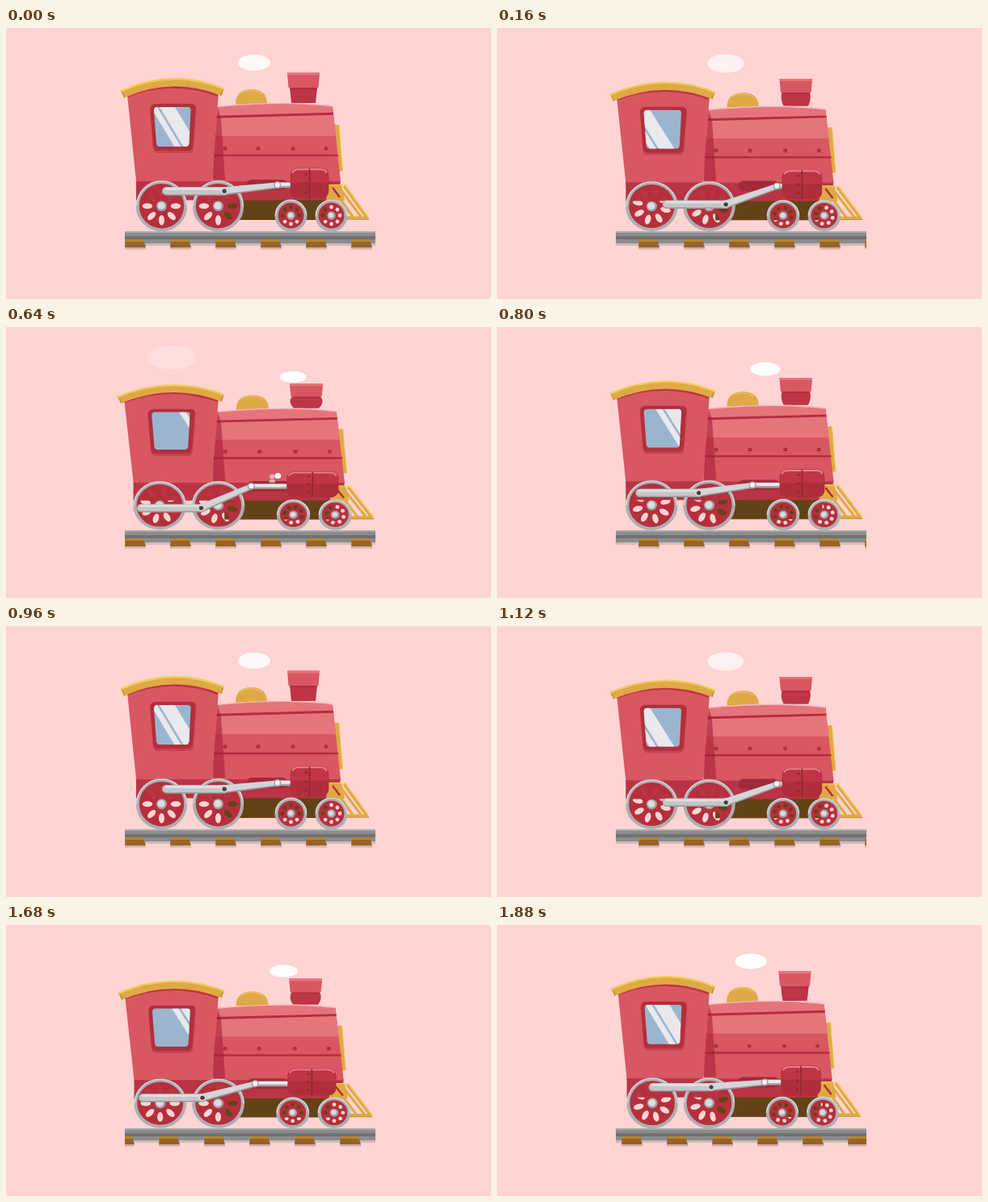
These frames come from a looping animation (600 by 336 pixels, 1.92 s). An HTML page with a canvas:

```html
<!DOCTYPE html>
<html>
<head>
<meta charset="utf-8">
<style>
html, body { margin: 0; width: 600px; height: 336px; overflow: hidden; background: #ffd4d2; }
canvas { display: block; }
</style>
</head>
<body>
<canvas id="stage" width="600" height="336"></canvas>
<script>
const ctx = document.getElementById('stage').getContext('2d');
const PERIOD = 960, STEP = 40, TAU = Math.PI * 2;
const RED = '#d85762', PALE = '#e6747b', DARK = '#b22f3c', DEEP = '#bd3546';
const GOLD = '#dfa945', SUN = '#f0cd58', STEEL = '#c6c6c8', BROWN = '#634218';

// age, x, y, rx, ry, opacity
const SMOKE = [
  [0, 372, 80, 14, 5, 1], [160, 355, 62, 16.5, 7, 1], [440, 314, 45, 19.5, 9.5, .95],
  [480, 307, 43, 20, 10, .85], [640, 283, 44, 22.5, 11.5, .68], [800, 258, 46, 25, 12, .6],
  [960, 231, 47.5, 28, 13, .45], [1120, 205, 38, 30, 15, .2], [1200, 192, 33, 31, 16, 0]
];

const triangle = p => 1 - Math.abs(1 - 2 * (((p % 1) + 1) % 1));

function fill(color, path) {
  ctx.fillStyle = color;
  ctx.fill(path instanceof Path2D ? path : new Path2D(path));
}
function stroke(color, width, path) {
  ctx.strokeStyle = color;
  ctx.lineWidth = width;
  ctx.stroke(new Path2D(path));
}
function rect(color, x, y, w, h) {
  ctx.fillStyle = color;
  ctx.fillRect(x, y, w, h);
}
function rounded(color, x, y, w, h, r) {
  const path = new Path2D();
  path.roundRect(x, y, w, h, r);
  fill(color, path);
}
function oval(color, x, y, rx, ry = rx) {
  const path = new Path2D();
  path.ellipse(x, y, rx, ry, 0, 0, TAU);
  fill(color, path);
}

function smoke(age) {
  const i = SMOKE.findIndex(k => k[0] > age);
  if (i < 1) return;
  const a = SMOKE[i - 1], b = SMOKE[i], f = (age - a[0]) / (b[0] - a[0]);
  const [, x, y, rx, ry, alpha] = a.map((v, j) => v + (b[j] - v) * f);
  ctx.globalAlpha = alpha;
  oval('#fff', x, y, rx, ry);
  ctx.globalAlpha = 1;
}

function track(t) {
  rect('#8c8c8d', 147, 252, 310, 15);
  rect('#a9abab', 147, 252, 310, 2);
  rect('#707273', 147, 258, 310, 4);
  rect('#d3b9b8', 147, 267, 310, 3);
  ctx.save();
  ctx.beginPath();
  ctx.rect(147, 250, 310, 30);
  ctx.clip();
  const shift = 56 - (t * .175) % 56;
  for (let x = 91 + shift; x < 460; x += 56) {
    rect('#cfb0ad', x, 272, 26, 2.5);
    fill('#966329', `M${x + 1} 262h22l3 10h-26z`);
    fill('#bb8429', `M${x + 1} 262h22l1 3h-23z`);
  }
  ctx.restore();
}

// Spoke holes are cut through, so whatever lies behind shows.
function wheel(x, y, r, angle, hub, distance, length, width) {
  const path = new Path2D();
  path.arc(x, y, r - 1, 0, TAU);
  for (let i = 0; i < 8; i++) {
    const a = angle + i * TAU / 8;
    const hx = x + distance * Math.cos(a), hy = y + distance * Math.sin(a);
    path.moveTo(hx + length * Math.cos(a), hy + length * Math.sin(a));
    path.ellipse(hx, hy, length, width, a, 0, TAU);
  }
  ctx.fillStyle = '#b5303c';
  ctx.fill(path, 'evenodd');
  ctx.lineWidth = 4;
  ctx.strokeStyle = '#aeaeb1';
  ctx.beginPath();
  ctx.arc(x, y, r - 2, 0, TAU);
  ctx.stroke();
  ctx.lineWidth = 1.2;
  ctx.strokeStyle = '#dcdcde';
  ctx.beginPath();
  ctx.arc(x, y, r - 1, Math.PI, TAU);
  ctx.stroke();
  oval('#a2a2a5', x, y, hub);
  oval('#dcdcde', x - .4, y - .4, hub - 2);
}

function chimney(s) {
  const top = 55.5 + 8 * s, mid = 74 + 5.5 * s, bulge = 10 * s;
  const half = (mid + 92) / 2;
  fill(DEEP, `M351 ${mid}H385Q${384 + bulge} ${half} 383 93H353Q${352 - bulge} ${half} 351 ${mid}z`);
  fill(DARK, `M351 ${mid}H385l0 2H351z`);
  fill(RED, `M348 ${top}H388L386.5 ${mid}H349.5z`);
  fill(PALE, `M348 ${top}H388L387.7 ${top + 3}H348.3z`);
}

function boiler() {
  fill(GOLD, 'M405 120H412L416.5 177L411 178.5z');
  stroke(SUN, 1, 'M412 120L416.5 178');
  fill(GOLD, 'M284 95Q284 76 303.5 76T323 95z');
  stroke('#e9bd60', 1.6, 'M289 81Q303 73 317 82');

  const shell = new Path2D('M258 98Q345 89 404 97L414 191H256z');
  ctx.save();
  ctx.clip(shell);
  rect(RED, 250, 80, 170, 115);
  rect(PALE, 250, 80, 170, 54);
  ctx.restore();
  stroke('#f1b9c2', 1.4, 'M262 97.5Q345 89.5 404 97');
  stroke(DARK, 3, 'M260 110.3L405 106.3');
  stroke(DARK, 2.6, 'M257 158H411');
  for (const x of [271, 312, 355, 396]) oval(DARK, x, 149.5, 2.5);
  fill('rgba(165, 25, 50, .55)', 'M262 98L266 112L271 188H254z');
}

function cab(p) {
  fill(RED, 'M150 82Q206 62 263 80L255 190H161z');
  stroke(DEEP, 3, 'M150 84.5Q206 62.5 262 83.5');
  fill(GOLD, 'M141.5 78.5Q206 48.5 270 75.5L266 84Q206 59.5 146.5 86.5z');
  stroke('#c49040', 1.5, 'M146.5 86.5L144.5 80.5M266 84L268 77.5');
  stroke(SUN, 2.4, 'M141.5 78.5Q206 49 270 75.5');

  fill('#c7414f', 'M185 95H230Q236 95 235.5 101L232 150Q231 155 226 155H188Q183 155 182 150L178 101Q178 95 185 95z');
  fill(DARK, 'M185 94H229Q235 94 234.5 100L231 147Q230 152 225 152H188Q183 152 182 147L178.5 100Q179 94 185 94z');
  const glass = new Path2D('M187 98H225Q229 98 228.5 102.500L226.500 143Q226 147 222.500 147H190Q186.500 147 186 143L183 102.500Q183 98 187 98z');
  fill('#9cb5cf', glass);
  ctx.save();
  ctx.clip(glass);
  const c = 209 - 110 * (p > .5 ? p - 1 : p);
  fill('#e9e8ed', `M${c} 98h-19l30 50h19zM${c - 22} 98h-8l30 50h8z`);
  ctx.restore();
}

function chassis() {
  rect(BROWN, 270, 211, 130, 27);
  fill('#b93444', 'M161 189H414L410 213.5H161z');
  fill(GOLD, 'M399 194H415L419 214H396z');
  ctx.lineJoin = 'round';
  stroke('#c18f3c', 1.5, 'M421 237H449');
  stroke(GOLD, 3.2, 'M402 196L429 234M411 196L439 234M418 196L446 235H422');
  stroke(SUN, 1.2, 'M400 194.5H420L449 235.5');
  stroke(DARK, 2.4, 'M404 198L413 210');
}

function cylinder(left, top, w, h) {
  const right = left + w, rim = top + 1.5;
  rounded('#b02e3c', left, top, w, h, 9);
  rounded(DEEP, left + 1, top + 2, w - 2, h * .42, [8, 8, 0, 0]);
  stroke('#ee808b', 2, `M${left + 3} ${top + 5}Q${left + 5} ${rim} ${left + 10} ${rim}H${right - 10}Q${right - 5} ${rim} ${right - 3} ${top + 5}`);
  stroke('#8f2532', 1.5, `M375.5 ${top + 1}V${top + h - 1}`);
  for (const f of [.2, .5, .8]) oval('#8f2532', 371, top + h * f, 1.5);
}

function drive(p, s) {
  const turn = p * TAU, crank = turn - 68 * Math.PI / 180;
  const hubY = 220.7 - 1.5 * s, smallY = 232.5 - s;
  for (const x of [192.5, 262.5]) wheel(x, hubY, 31.7, turn, 6.5, 17.5, 6.3, 3.5);
  for (const x of [352.5, 402.5]) wheel(x, smallY, 20, turn, 5.2, 10.5, 2.4, 2.4);

  const px = 262.5 + 20.5 * Math.cos(crank), py = hubY + 20.5 * Math.sin(crank);
  const jy = 194.7, jx = px + Math.sqrt(66 * 66 - (jy - py) ** 2);
  const stretch = triangle(p - .07), w = 44.5 + 22 * stretch, left = 375.5 - w / 2;

  ctx.lineCap = 'round';
  stroke('#a5a5a9', 7, `M${jx} ${jy}H${left + 6}`);
  stroke('#e9e9eb', 4, `M${jx} ${jy - 1}H${left + 6}`);
  cylinder(left, 173.5 + 2.5 * stretch, w, 38.5 - 6 * stretch);

  stroke('#9a9a9e', 10.5, `M${px - 72} ${py + .7}H${px}`);
  stroke(STEEL, 9, `M${px - 72} ${py}H${px}`);
  stroke('#dfdfe1', 3, `M${px - 72} ${py - 2.2}H${px}`);
  ctx.save();
  ctx.translate(px, py);
  ctx.rotate(Math.atan2(jy - py, jx - px));
  fill('#99999d', 'M-3 -4.5L66 -3.2V4L0 5.5z');
  fill('#d5d5d8', 'M-3 -4.5L66 -3.2V2.5L0 3.8z');
  ctx.restore();
  oval('#d5d5d8', px, py, 4.8);
  oval('#45403f', px, py + .5, 2.6);
  oval('#a2a2a6', jx, jy, 4.6);
  oval('#f6f6f7', jx, jy - .3, 3);
}

function steam(p) {
  const f = (p - .3) / .45;
  if (f < 0 || f > 1) return;
  const q = 1 - (1 - f) ** 3;
  const size = Math.min(1, f * 3) * Math.min(1, (1 - f) * 5);
  oval('#fff', 344 - 10 * q, 190 - 9 * q, 4 * size);
  ctx.globalAlpha = 1 - .6 * f;
  oval('#fff', 344 - 17 * q, 190 - 8 * q, 3.4 * size);
  oval('#fff', 341 - 14 * q, 190 - 2 * q, 4 * size, 2.5 * size);
  ctx.globalAlpha = 1;
}

function draw(now) {
  const t = Math.floor(now / STEP) * STEP % (2 * PERIOD);
  const p = t % PERIOD / PERIOD, s = triangle(p);
  rect('#ffd4d2', 0, 0, 600, 336);
  const age = (t + PERIOD / 2) % PERIOD;
  smoke(age);
  smoke(age + PERIOD);
  track(t);
  ctx.save();
  ctx.translate(262, 252);
  ctx.scale(1 + .05 * s, 1 - .073 * s);
  ctx.translate(-262, -252);
  ctx.lineCap = 'butt';
  chimney(s);
  chassis();
  boiler();
  cab(p);
  rect(DEEP, 161, 190, 252, 2);
  rounded('#a02b3a', 298, 188, 50, 13, 6);
  steam(p);
  drive(p, s);
  ctx.restore();
}

const start = performance.now();
function frame() {
  draw(performance.now() - start);
  requestAnimationFrame(frame);
}
frame();
</script>
</body>
</html>
```
